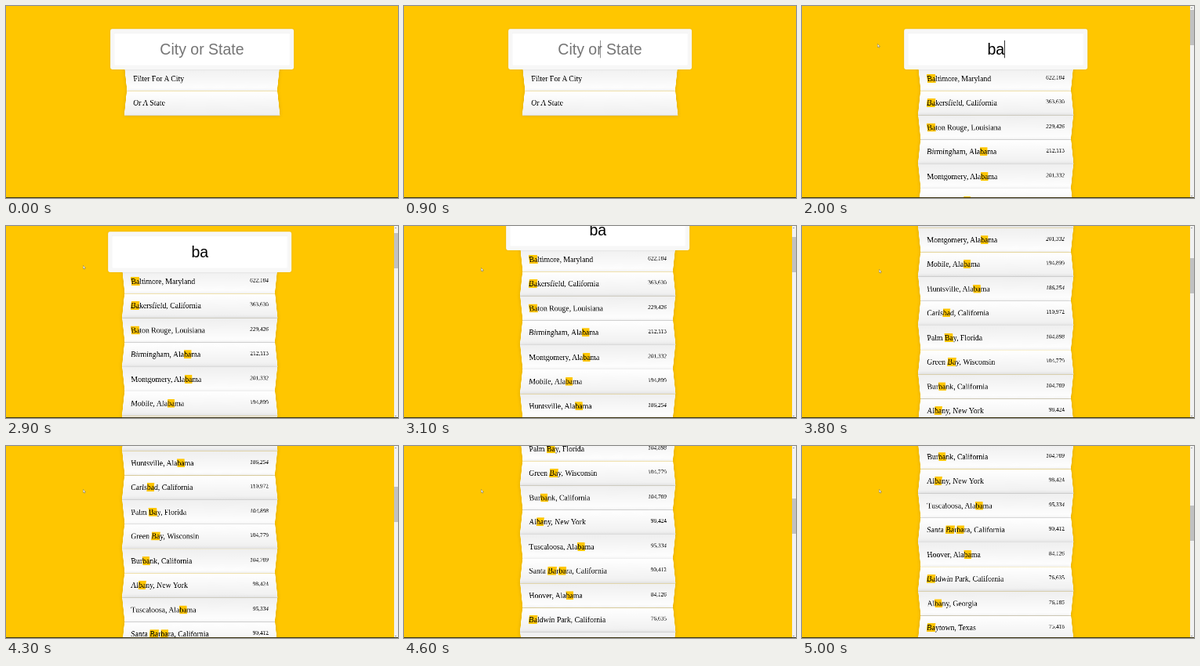
Animation, 500 px wide and 245 px high, one loop 6200 ms. Source, as an HTML page:

```html
<!DOCTYPE html>
<html lang="en">
<head>
<meta charset="utf-8">
<title>City search</title>
<style>
  html, body { margin: 0; width: 100%; height: 100%; overflow: hidden; background: #ffc600; }
  #stage { position: absolute; left: 0; top: 0; width: 500px; height: 245px; overflow: hidden; background: #ffc600; }
  #page { position: absolute; left: 0; top: 0; transform-origin: 0 0; font: 20px/23px "Liberation Serif", "Times New Roman", serif; color: #000; }
  #form { position: absolute; top: 50px; width: 400px; }
  #field {
    position: absolute; z-index: 2; top: 10px; left: -40px; width: 480px; height: 106px;
    box-sizing: border-box; padding: 20px; border: 10px solid #f7f7f7; border-radius: 5px;
    background: #fff; text-align: center; font: 40px/46px "Liberation Sans", Arial, sans-serif;
    box-shadow: 0 0 5px rgba(0,0,0,.12), inset 0 0 2px rgba(0,0,0,.19);
  }
  #field.empty { color: #757575; }
  #caret { position: absolute; top: 20px; width: 1.6px; height: 46px; background: #222; }
  ul { position: absolute; top: 106px; left: 0; width: 400px; margin: 0; padding: 0; }
  li {
    display: flex; justify-content: space-between; align-items: flex-start; box-sizing: border-box;
    height: 64px; padding: 20px; list-style: none; white-space: nowrap;
    border-bottom: 1px solid #d8d8d8; box-shadow: 0 0 10px rgba(0,0,0,.14);
  }
  li:nth-child(odd) {
    transform: perspective(100px) rotateX(-3deg) translateY(3px);
    background: linear-gradient(to top, #fff, #efefef);
  }
  li:nth-child(even) {
    transform: perspective(100px) rotateX(3deg) translateY(2px) scale(1.001);
    background: linear-gradient(to bottom, #fff, #efefef);
  }
  li small { font-size: 15px; line-height: 17px; }
  mark { background: #ffc600; color: inherit; }
  #bar { position: absolute; right: 0; top: 0; width: 5.5px; height: 245px; background: #f1f1f1; }
  #bar i { position: absolute; left: 1.5px; border: solid transparent; border-width: 0 1.3px; }
  #up { top: 2px; border-bottom: 1.8px solid #505050 !important; }
  #down { bottom: 2px; border-top: 1.8px solid #505050 !important; }
  #thumb { position: absolute; left: .5px; width: 4.5px; height: 45px; background: #c1c1c1; }
  #mouse { position: absolute; left: 0; top: 0; width: 4px; height: 6px; }
  #edge { position: absolute; left: 0; bottom: 0; width: 500px; height: 1px; background: #3d3413; }
</style>
</head>
<body>
<div id="stage">
  <div id="page">
    <div id="form">
      <div id="field"><span id="text"></span><div id="caret"></div></div>
      <ul id="list"></ul>
    </div>
  </div>
  <div id="bar"><i id="up"></i><div id="thumb"></div><i id="down"></i></div>
  <svg id="mouse" viewBox="0 0 4 6"><path d="M.4 .4V4.6L1.4 3.8L2.1 5.3L2.8 5L2.2 3.5H3.5Z" fill="#fff" stroke="#555" stroke-width=".4"/></svg>
  <div id="edge"></div>
</div>
<script>
const LOOP = 6200, SCALE = 0.4875, STEP = 100;
const $ = id => document.getElementById(id);

const intro = [['Filter For A City'], ['Or A State']];
const cities = `Baltimore, Maryland|622,104
Bakersfield, California|363,630
Baton Rouge, Louisiana|229,426
Birmingham, Alabama|212,113
Montgomery, Alabama|201,332
Mobile, Alabama|194,899
Huntsville, Alabama|186,254
Carlsbad, California|110,972
Palm Bay, Florida|104,898
Green Bay, Wisconsin|104,779
Burbank, California|104,709
Albany, New York|98,424
Tuscaloosa, Alabama|95,334
Santa Barbara, California|90,412
Hoover, Alabama|84,126
Baldwin Park, California|76,635
Albany, Georgia|76,185
Baytown, Texas|75,418`.split('\n').map(line => line.split('|'));

// [start, typed text, caret shown]
const typing = [
  [0, '', false], [900, '', true], [1500, '', false],
  [1900, 'b', true], [2000, 'ba', true], [2500, 'ba', false]
];
// [start, x, y]
const pointer = [
  [1900, 95, 48], [2000, 96, 48], [2500, 97, 49], [2700, 98, 50], [3000, 98, 53], [3300, 98, 55]
];
// [start, offsets at each step]
const scrolls = [
  [0, [0]],
  [2700, [4, 12, 22, 36, 50, 65, 81, 98.4, 122, 147, 174, 199.7, 226, 243.8]],
  [4300, [258, 283, 311, 338.6, 359, 375, 386, 390.9]]
];

const current = (table, t) => table.filter(row => row[0] <= t).pop();

function offset(t) {
  const [start, values] = current(scrolls, t);
  return values[Math.min(values.length - 1, Math.floor((t - start) / STEP))];
}

function highlight(name, term) {
  return term ? name.replace(new RegExp(term, 'gi'), '<mark>$&</mark>') : name;
}

let shown = null;
function fill(term) {
  if (term === shown) return;
  shown = term;
  $('text').textContent = term || 'City or State';
  $('field').className = term ? '' : 'empty';
  $('list').innerHTML = (term ? cities : intro).map(([name, count = '']) =>
    `<li><span>${highlight(name, term)}</span><small>${count}</small></li>`).join('');
  const width = (term ? 494.5 : 500) / SCALE;
  $('form').style.left = width / 2 - 200 + 'px';
  $('bar').style.display = term ? 'block' : 'none';
}

function draw(t) {
  const [, term, caret] = current(typing, t);
  fill(term);
  $('caret').style.display = caret ? 'block' : 'none';
  $('caret').style.left = 230 + term.length * 11.12 + 'px';

  const y = offset(t);
  $('page').style.transform = `translateY(${-y}px) scale(${SCALE})`;
  $('thumb').style.top = 5 + y * 0.182 + 'px';

  const at = current(pointer, t);
  $('mouse').style.display = at ? 'block' : 'none';
  if (at) $('mouse').style.transform = `translate(${at[1]}px, ${at[2]}px)`;
}

const begin = performance.now();
function tick() {
  draw((performance.now() - begin) % LOOP);
  requestAnimationFrame(tick);
}
tick();
</script>
</body>
</html>
```
